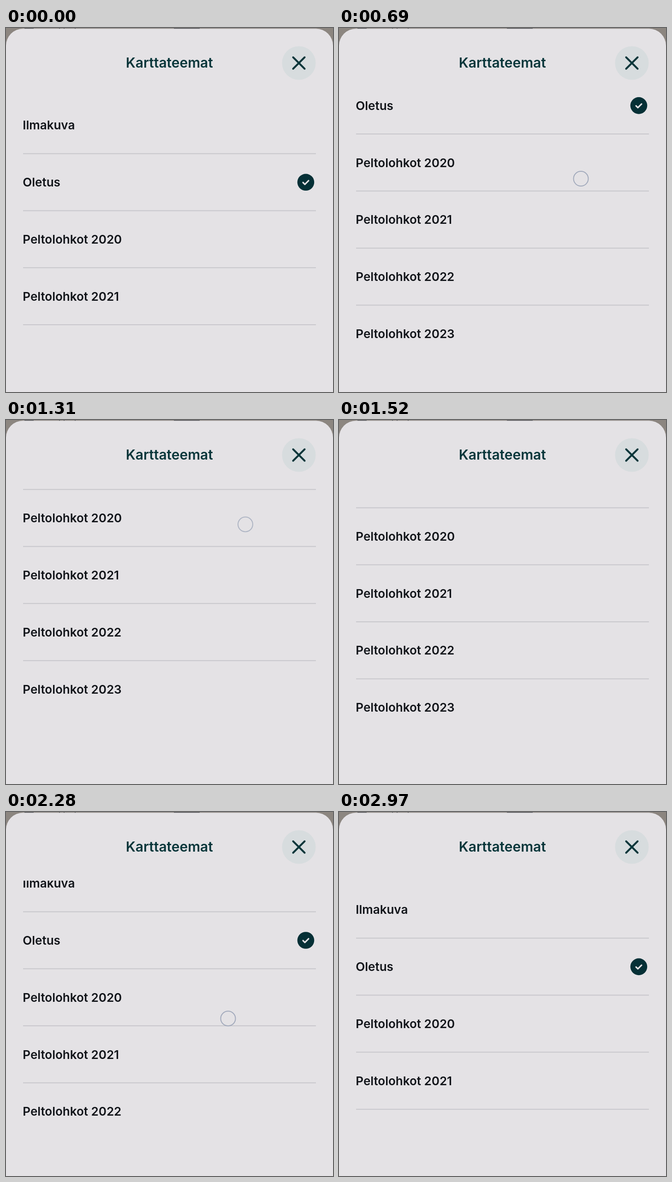
An HTML page for the animation above (3040 ms loop, 709 by 790 pixels).

```html
<!DOCTYPE html>
<html lang="fi">
<head>
<meta charset="utf-8">
<title>Karttateemat</title>
<style>
  html, body { margin: 0; width: 100%; height: 100%; overflow: hidden; background: #e4e2e5; }
  svg { display: block; width: 100vw; height: 100vh; }
  text { font: 600 26px Inter, "Open Sans", sans-serif; font-optical-sizing: none; fill: #111419; }
  .title { font-size: 29.9px; fill: #08363a; text-anchor: middle; }
  .stroke { fill: none; stroke-linecap: round; stroke-linejoin: round; }
</style>
</head>
<body>
<svg viewBox="0 0 709 790">
  <defs>
    <clipPath id="window"><rect y="149" width="709" height="537"/></clipPath>
  </defs>
  <rect width="709" height="60" fill="#8c8680"/>
  <path d="M40 1H60M116 0V2M126 0V2M150 0V2M364 1H420" stroke="#4a4a4c" stroke-width="2"/>
  <rect y="1.5" width="709" height="830" rx="37" fill="#e4e2e5"/>
  <text class="title" x="354.3" y="86.3">Karttateemat</text>
  <circle cx="635" cy="76" r="36.5" fill="#d7dcde"/>
  <path class="stroke" d="M622.5 63.5L647.5 88.5M647.5 63.5L622.5 88.5" stroke="#06363a" stroke-width="4"/>
  <g clip-path="url(#window)"><g id="list"></g></g>
  <circle id="touch" r="16" fill="none" stroke="#a2aabc" stroke-width="2"/>
</svg>
<script>
const LOOP = 3040;
const LABELS = ["Ilmakuva", "Oletus", ...[2020, 2021, 2022, 2023].map(year => `Peltolohkot ${year}`)];
const ROW_HEIGHT = 123.8;
const SCROLL_END = -204.5;
const STIFFNESS = 0.66;   // share of the pull that remains past either end
const SPRING = 0.024;     // speed of the return after release, per ms
const list = document.getElementById("list");
const touch = document.getElementById("touch");

const SWIPES = [
  { start: 225, end: 1310, release: 1310, from: [533.6, 493.5], to: [519, 226.5], origin: 0, travel: -267 },
  { start: 2025, end: 2640, release: 2760, from: [498.5, 308.5], to: [470.5, 539], origin: SCROLL_END, travel: 244.5 }
];

// The picture advances in 70 ms ticks; a few ticks last 130 ms.
const LONG_TICKS = [420, 1180, 1940, 2560];
const TICKS = [];
for (let t = 0; t < LOOP; t += LONG_TICKS.includes(t) ? 130 : 70) TICKS.push(t);

const clamp = (v, min = 0, max = 1) => Math.min(max, Math.max(min, v));
const mix = (a, b, p) => a + (b - a) * p;

function progress(swipe, t) {
  return Math.sin(clamp((t - swipe.start) / (swipe.end - swipe.start)) * Math.PI / 2);
}

function scrollAt(swipe, t) {
  const pulled = swipe.origin + swipe.travel * progress(swipe, t);
  const inside = clamp(pulled, SCROLL_END, 0);
  const decay = SPRING * Math.max(0, t - swipe.release);
  return inside + (pulled - inside) * STIFFNESS * (1 + decay) * Math.exp(-decay);
}

function buildRow(label, i) {
  const y = 211 + i * ROW_HEIGHT;
  const check = label === "Oletus"
    ? `<g transform="translate(650 ${y})"><circle r="18.3" fill="#053036"/>
       <path class="stroke" d="M-6 .5L-2 4.5L6 -3.5" stroke="#e4e2e5" stroke-width="3.2"/></g>`
    : "";
  const line = i < LABELS.length - 1
    ? `<path d="M37 ${y + 61.7}H672" stroke="#c8c7cc" stroke-width="2"/>`
    : "";
  return `<text x="36.3" y="${y + 9.4}">${label}</text>${check}${line}`;
}

function render(time) {
  const now = time % LOOP;
  const t = TICKS.filter(tick => tick <= now).pop();
  const swipe = t < 1700 ? SWIPES[0] : SWIPES[1];
  const p = progress(swipe, t);
  const fadeIn = clamp((t - swipe.start + 180) / 90);
  const fadeOut = clamp((swipe.release + 100 - t) / 125);
  list.setAttribute("transform", `translate(0 ${scrollAt(swipe, t)})`);
  touch.setAttribute("cx", mix(swipe.from[0], swipe.to[0], p));
  touch.setAttribute("cy", mix(swipe.from[1], swipe.to[1], p));
  touch.setAttribute("opacity", Math.min(fadeIn, fadeOut));
}

list.innerHTML = LABELS.map(buildRow).join("");
const start = performance.now();
function loop() {
  render(performance.now() - start);
  requestAnimationFrame(loop);
}
loop();
</script>
</body>
</html>
```
